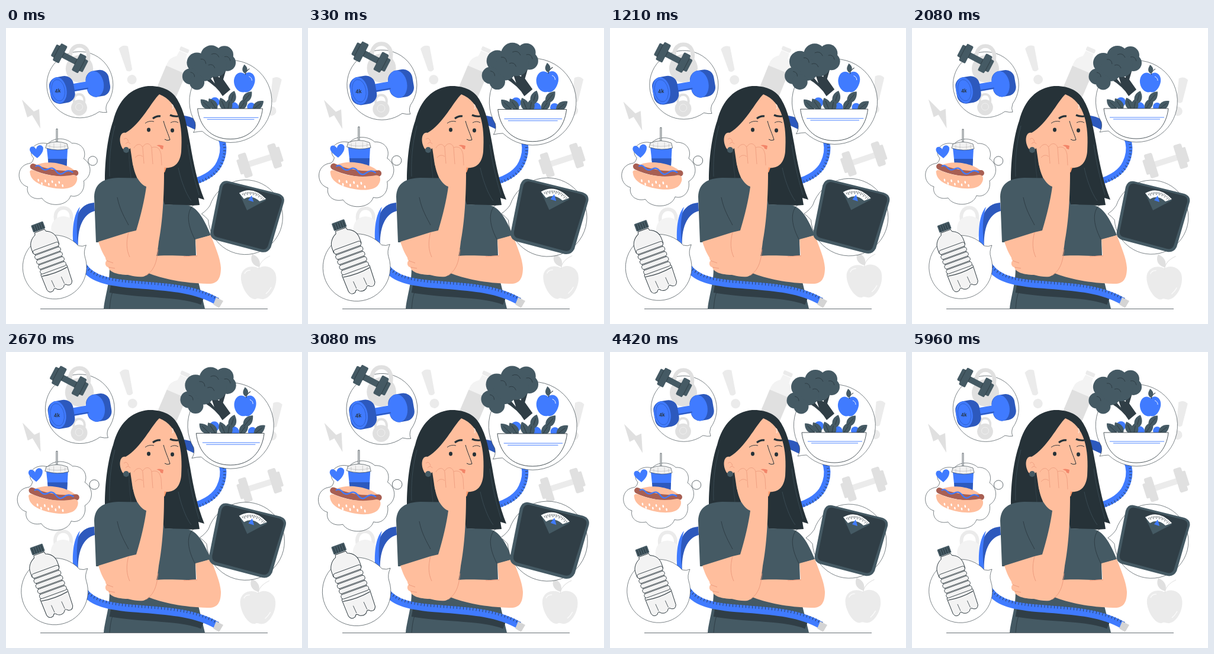
Recreate the animation shown at these times as an HTML page with a canvas. Size 500 by 500 pixels, loop 6 s.

```html
<!DOCTYPE html>
<html lang="en">
<head>
<meta charset="utf-8">
<title>Healthy habits worries</title>
<style>
html, body { margin: 0; width: 100%; height: 100%; overflow: hidden; background: #fff; }
canvas { display: block; width: 100vw; height: 100vh; }
</style>
</head>
<body>
<canvas id="stage"></canvas>
<script>
const canvas = document.getElementById('stage');
const c = canvas.getContext('2d');
const LOOP = 6000;
const INK = '#263238', SLATE = '#455a64', DARK = '#303e46', SKIN = '#ffbe9d', FOLD = '#e99477';
const BLUE = '#407bff', DEEP = '#2d59bd', GREY = '#e0e0e0', PALE = '#ebebeb';

const cache = {};
function path(d, fill, stroke, w = 0.7) {
  const p = cache[d] || (cache[d] = new Path2D(d));
  if (fill) { c.fillStyle = fill; c.fill(p); }
  if (stroke) { c.strokeStyle = stroke; c.lineWidth = w; c.stroke(p); }
}
function oval(x, y, rx, ry, fill, stroke, turn = 0, w = 0.7) {
  c.beginPath();
  c.ellipse(x, y, rx, ry, turn, 0, 7);
  if (fill) { c.fillStyle = fill; c.fill(); }
  if (stroke) { c.strokeStyle = stroke; c.lineWidth = w; c.stroke(); }
}
const dot = (x, y, r, fill, stroke) => oval(x, y, r, r, fill, stroke);
function box(x, y, w, h, r, fill, stroke) {
  c.beginPath();
  c.roundRect(x, y, w, h, r);
  if (fill) { c.fillStyle = fill; c.fill(); }
  if (stroke) { c.strokeStyle = stroke; c.lineWidth = 0.8; c.stroke(); }
}
function at(x, y, turn, scale, draw) {
  c.save();
  c.translate(x, y);
  c.rotate(turn);
  c.scale(scale, scale);
  draw();
  c.restore();
}
const grow = (x, y, s, draw) => at(x, y, 0, s, () => { c.translate(-x, -y); draw(); });

// Keys are [time, value] pairs.
function tween(keys, t, soft) {
  let i = 1;
  while (i < keys.length - 1 && t > keys[i][0]) i++;
  const [t0, a] = keys[i - 1], [t1, b] = keys[i];
  let k = Math.min(1, Math.max(0, (t - t0) / (t1 - t0)));
  if (soft) k = (1 - Math.cos(Math.PI * k)) / 2;
  return a + (b - a) * k;
}
const BEAT = [[0, 1], [600, 1.1], [1800, 1], [2400, 1], [3000, 1.1], [3650, 1], [6000, 1]];
const SWAY = [[0, 0], [1200, -0.9], [2450, 0.42], [3100, 0.3], [4500, -0.22], [6000, 0]];
const BOLT = [[0, 1], [650, 1.6], [1200, -1.6], [2080, 1.4], [3080, 1], [4420, -1.6], [6000, 1]];

function kettlebell(x, y, s, handle, body) {
  at(x, y, 0, s, () => {
    path('M-13 4 C-26 -34 26 -34 13 4', null, handle, 6.5);
    dot(0, 14, 23, body);
  });
}

function alarm(x, y, turn, s) {
  at(x, y, turn, s, () => {
    path('M-8 -30 Q0 -36 8 -30 L5 9 Q0 14 -5 9 Z', PALE);
    dot(0, 26, 8, PALE);
  });
}

function greyBottle() {
  at(284, 78, 0.4, 1, () => {
    path('M-7 -40 L7 -40 L8 -30 Q18 -23 18 -12 L18 45 L-18 45 L-18 -12 Q-18 -23 -8 -30 Z', '#f3f3f3');
    path('M-18 -8 L18 -8 L18 45 L-18 45 Z', GREY);
    box(-8, -48, 16, 7, 2, PALE);
  });
}

function greyDumbbell() {
  at(429, 224, -0.31, 1, () => {
    box(-27, -5, 54, 10, 2, PALE);
    for (const k of [-1, 1]) {
      box(k * 26 - 7, -21, 14, 42, 3, GREY);
      box(k * 34 - 4, -13, 8, 26, 2, GREY);
    }
  });
}

function greyApple() {
  path('M427 406 C433 400 449 401 455 414 C461 432 448 456 435 458 C430 459 426 455 422 458 C410 460 395 435 397 418 C400 402 418 400 427 406 Z', PALE);
  path('M427 407 C428 397 435 390 446 385', null, GREY, 1);
  path('M428 404 C415 401 412 391 416 382 C426 386 431 393 428 404 Z', GREY);
  path('M403 415 C405 410 409 409 413 409 M448 438 Q444 445 439 449', null, '#fafafa', 1.5);
}

function backdrop(t) {
  at(245, 243, tween(SWAY, t, true) * Math.PI / 180, 1, () => {
    c.translate(-245, -243);
    at(tween(BOLT, t, true), 0, 0, 1, () =>
      path('M26 121 L46 141 L55 137 L57 170 L43 147 L35 151 Z', GREY));
    alarm(206, 62, -0.26, 1);
    alarm(453, 115, 0.17, 0.98);
    greyBottle();
    kettlebell(97, 326, 0.9, PALE, '#f3f3f3');
    greyDumbbell();
    greyApple();
  });
}

function ticks(d, dx, dy) {
  c.save();
  c.translate(dx, dy);
  c.setLineDash([0.8, 4.7]);
  path(d, null, INK, 4.5);
  c.restore();
}

function tapeBack() {
  const d = 'M345 162 C368 180 372 205 361 228 C353 245 337 254 316 260';
  path(d, null, BLUE, 11);
  ticks(d, 2.5, 2.5);
  path('M300 148 C310 149 317 152 325 158 L320 172 L303 164 Z', DEEP);
  path('M149 295 C122 297 112 322 114 372 L122 372 C120 338 130 314 150 309 Z', DEEP);
  path('M125 302 C114 315 111 340 114 372 L122 372 C119 344 118 325 125 302 Z', BLUE);
}

function tapeFront() {
  path('M176 440 C230 450 295 446 332 461', null, DARK, 14);
  const d = 'M126 394 C138 421 165 428 202 432 C258 437 315 437 357 462';
  path(d, null, BLUE, 12.5);
  ticks(d, 1, -4);
  path('M355 455 L367 461 L360 473 L350 467 Z', '#d4d4d4');
}

function face() {
  path('M240 98 C264 97 281 106 289 120 C302 141 306 168 311 195 C317 230 323 260 335 290 L325 287 L327 299 C305 301 285 299 266 298 L258 260 L167 257 C167 222 172 182 181 157 C190 121 211 101 240 98 Z', INK);
  path('M259 112 C246 124 228 162 202 177 C193 175 190 188 195 200 C198 208 205 208 210 203 L214 230 L222 255 L262 244 L266 236 C285 238 294 228 296 209 C299 165 292 125 259 112 Z', SKIN);
  path('M262 234 L271 236 L268 244 L262 242 Z', '#ff9a6c');
  path('M199 188 Q204 183 207 192 M202 196 Q206 190 210 196', null, FOLD);
  dot(203, 206, 5, SLATE);
  path('M248 153 Q254 148 261 149', null, INK, 3.2);
  path('M277 147 Q283 150 291 149', null, INK, 3.2);
  path('M235 161 Q241 156 250 158 M278 160 Q285 156 291 160', null, INK, 0.9);
  oval(241, 172, 3, 3.4, INK);
  oval(281, 173, 3, 3.4, INK);
  path('M266 157 C269 169 275 181 277 189 Q272 191 268 188', null, INK, 1);
  path('M249 201 Q257 195 266 199 L265 205 Q256 202 249 201 Z', '#f28468');
  path('M280 129 Q284 132 281 137', null, '#ffdccb', 2);
  path('M208 207 C207 230 211 245 211 255', null, '#37474f', 0.7);
  path('M184 165 C176 195 174 225 175 251 M291 236 C296 260 305 282 313 292 M307 197 C312 235 321 265 326 282', null, SLATE, 0.6);
}

function body() {
  path('M149 285 C150 263 163 254 190 253 L255 254 L268 298 L306 299 C323 303 333 319 346 350 L320 358 L321 385 L324 425 L336 474 L165 474 C168 447 178 425 174 390 L172 362 L152 362 Z', SLATE);
  path('M188 286 C192 307 201 321 207 333 M319 357 C304 328 306 308 317 299 M180 446 C176 457 176 467 175 474', null, INK, 0.7);
  path('M320 357 L346 350 C354 371 362 389 363 405 C363 425 356 433 340 432 C301 431 264 424 238 413 L248 386 C274 382 302 387 322 384 Z', SKIN);
  path('M178 382 C168 382 166 389 170 393 C166 396 168 404 173 404 C174 412 187 416 202 417 L235 417 L225 385 Z', SKIN);
  path('M156 361 L207 345 L220 342 C228 316 234 290 237 268 C219 261 209 228 215 197 C223 187 240 190 260 201 L269 222 L267 244 C267 295 263 336 258 361 C254 398 246 416 232 420 C204 422 183 407 174 396 C164 384 160 373 156 361 Z', SKIN);
  path('M207 345 C203 361 203 374 209 387 M237 418 C253 407 255 390 257 374 M170 393 L181 397 M173 404 L184 406 M323 385 C316 384 309 386 300 386', null, FOLD, 0.8);
  path('M216 203 C220 195 229 194 231 203 L233 229 M231 201 C236 192 245 195 246 203 L248 230 M246 202 C255 199 260 203 262 214 L263 232 M218 219 Q224 212 231 217', null, FOLD, 0.7);
}

function bubble(d) { path(d, '#fff', INK, 0.6); }

function blackDumbbell() {
  at(107.5, 51.5, 0.48, 1, () => {
    box(-15, -5, 30, 10, 1, SLATE);
    for (const k of [-1, 1]) {
      box(k * 18 - 6, -16, 12, 32, 2, SLATE);
      box(k * 26 - 4, -11, 8, 22, 2, SLATE);
    }
    path('M-12 -5 L-12 5 M12 -5 L12 5 M-24 -12 L-24 12 M24 -12 L24 12', null, INK, 0.6);
  });
}

function gym() {
  bubble('M170 128 A55.5 55.5 0 1 0 157 141 Q165 143 170 142 Q167 136 170 128 Z');
  kettlebell(124, 55, 1, GREY, GREY);
  kettlebell(123.5, 126, 0.58, GREY, GREY);
  dot(123.5, 133, 6, null, '#f5f5f5');
  blackDumbbell();
  at(124, 99, -0.17, 1, () => {
    box(12, -22, 39, 44, 15, DEEP);
    oval(26, 0, 15, 22, BLUE);
    box(-16, -6.5, 34, 13, 3, BLUE);
    path('M-14 5 L14 5', null, DEEP, 2);
    box(-50, -22, 41, 45, 15, DEEP);
    oval(-36, 0, 14, 22, BLUE);
    oval(-36, 0, 11, 18, null, DEEP);
    c.fillStyle = INK;
    c.font = 'italic bold 9px Lato, sans-serif';
    c.textAlign = 'center';
    c.fillText('4k', -37, 4);
  });
}

function meal() {
  bubble('M47 220 C35 207 51 190 71 196 C83 183 103 187 111 195 C128 194 136 208 131 221 C145 230 145 250 131 258 C134 276 121 287 109 283 C103 302 70 302 61 287 C45 291 34 280 37 268 C18 263 17 233 39 229 Q45 229 47 220 Z');
  dot(146, 224.5, 7.7, '#fff', INK);
  path('M85 194 L85 171 L87 171 L87 194 Z', '#fff', INK, 0.7);
  path('M69 203 L104 203 L102 240 L73 240 Z', BLUE);
  path('M71 221 L103 221 L102 240 L73 240 Z', DEEP);
  path('M69 196 Q86 189 103 196 L105 204 Q87 209 67 203 Z', '#f2f2f2', INK, 0.6);
  path('M68 199 Q86 204 104 199 M74 197 L74 203 M81 195 L81 204 M92 195 L92 204 M99 197 L99 203', null, '#b8b8b8', 0.6);
  path('M53 220 C47 215 38 209 41 203 C44 198 50 202 51 205 C53 196 61 197 63 202 C64 209 59 215 53 220 Z', BLUE);
  path('M50 232 C68 222 105 229 117 242 L100 252 Z', SKIN);
  c.lineCap = 'round';
  path('M46 234 C62 242 92 249 117 245', null, '#a85f53', 10);
  c.lineCap = 'butt';
  path('M50 234 Q55 230 60 236 T72 238 T85 242 T98 244 T113 244', null, BLUE, 2.2);
  path('M41 245 C39 239 46 239 51 242 C70 250 93 252 113 248 C121 247 122 256 117 263 C111 272 93 273 75 269 C56 265 42 257 41 245 Z', SKIN);
  for (let i = 0; i < 8; i++)
    oval(55 + i * 5.8, 257 + (i % 2) * 5 + i * 0.6, 1.3, 2.4, '#fff', null, -0.2);
}

function water() {
  bubble('M122 368 A53.5 53.5 0 1 0 133 387 Q130 378 135 367 Q129 370 122 368 Z');
  at(73, 387, -0.35, 0.97, () => {
    path('M-9 -48 L9 -48 L10 -44 C20 -40 24 -32 24 -24 L24 -16 L21 -12 L21 20 L24 24 L23 52 Q20 60 13 56 Q9 51 6 57 Q0 61 -6 57 Q-10 51 -13 57 Q-21 60 -23 52 L-24 24 L-21 20 L-21 -12 L-24 -16 L-24 -24 C-24 -32 -19 -40 -10 -44 Z', '#f3f3f3', INK, 0.9);
    for (let y = -16; y <= 20; y += 9) box(-23.5, y - 4, 47, 7.5, 3.7, '#f3f3f3', INK);
    path('M-23 27 Q0 31 23 27', null, INK, 1.1);
    path('M-9 52 L-10 39 M9 52 L8 39', null, INK, 0.7);
    box(-11, -62, 22, 13, 1.5, SLATE);
    for (let x = -8; x < 10; x += 4) path(`M${x} -60 L${x} -50`, null, INK, 0.9);
  });
}

function broccoli() {
  path('M338 76 L353 94 L347 76 L361 84 L362 68 L372 70 L367 87 L379 104 L366 115 Q357 99 335 86 Z', DARK);
  const lumps = [[323, 59, 17], [347, 48, 18], [369, 46, 15], [374, 59, 14], [354, 64, 19], [335, 72, 18], [312, 82, 13.5], [323, 92, 12.5]];
  for (const [x, y, r] of lumps) dot(x, y, r, SLATE);
  path('M329 53 Q337 52 338 61 M347 45 Q356 41 360 50 M369 49 Q377 47 379 56 M312 75 Q319 76 319 83 M342 63 Q350 60 353 68', null, INK, 0.7);
}

function salad() {
  bubble('M320 159 A69 69 0 1 1 332 174 Q325 174 317 176 Q322 169 320 159 Z');
  broccoli();
  path('M403 78 C412 71 422 79 420 91 C418 102 410 111 403 108 C393 111 384 100 385 88 C387 75 397 73 403 78 Z', BLUE);
  path('M404 79 Q404 74 411 69', null, INK, 1);
  path('M403 77 C395 71 402 64 402 62 C409 67 409 73 403 77 Z', SLATE);
  path('M410 82 Q415 84 415 89', null, '#fff', 0.9);
  dot(353, 125, 8, BLUE);
  dot(384, 134, 9, BLUE);
  dot(414, 133, 7, BLUE);
  const leaves = [[338, 129, -0.8], [350, 129, -0.6], [367, 129, -0.4], [382, 118, 0.3], [400, 129, 0.6], [407, 117, 0.7], [425, 131, 0.9], [376, 131, 0.2]];
  for (const [x, y, turn] of leaves) at(x, y, turn, 1.12, () => {
    path('M0 10 C-9 3 -6 -6 0 -11 C6 -5 9 4 0 10 Z', SLATE);
    path('M0 9 L0 -6', null, INK, 0.6);
  });
  path('M324 136 L433 136 C430 164 412 187 379 187 C346 187 327 165 324 136 Z', '#fff', INK, 0.8);
  path('M334 151 L426 151 M340 154 L419 154', null, BLUE, 0.9);
}

function weigh() {
  bubble('M345 300 A62.5 62.5 0 1 1 342 324 Q337 318 331 314 Q340 308 345 300 Z');
  path('M375 259 L460 280 Q471 284 469 294 L447 370 Q442 380 431 378 L355 358 Q344 354 346 343 L361 268 Q365 257 375 259 Z', SLATE);
  path('M377 263 L458 283 Q467 286 465 294 L442 368 Q439 375 431 373 L357 353 Q350 351 351 343 L366 269 Q369 261 377 263 Z', DARK);
  path('M394 279 Q419 269 439 291 L407 308 Z', SLATE);
  path('M394 279 Q417 266 439 289 L428 293 Q415 281 402 289 Z', '#fff');
  at(412, 307, 0.22, 1, () => {
    for (let i = -7; i <= 7; i++) {
      const a = i * 0.095, r = i % 2 ? 27 : 25;
      path(`M${Math.sin(a) * 30} ${-Math.cos(a) * 30} L${Math.sin(a) * r} ${-Math.cos(a) * r}`, null, INK, 0.7);
    }
  });
  path('M415 283 L418 294 L409 291 Z', BLUE);
}

function draw(t) {
  const w = canvas.clientWidth, h = canvas.clientHeight, d = devicePixelRatio || 1;
  if (canvas.width !== Math.round(w * d) || canvas.height !== Math.round(h * d)) {
    canvas.width = Math.round(w * d);
    canvas.height = Math.round(h * d);
  }
  c.setTransform(canvas.width / 500, 0, 0, canvas.height / 500, 0, 0);
  c.fillStyle = '#fff';
  c.fillRect(0, 0, 500, 500);
  c.lineJoin = 'round';
  backdrop(t);
  path('M58 474.5 L442 474.5', null, INK, 0.7);
  tapeBack();
  face();
  body();
  tapeFront();
  const s = tween(BEAT, (t + 50) % LOOP);
  grow(123.5, 89.5, s, gym);
  grow(88, 235, s, meal);
  grow(83.5, 391, s, water);
  grow(375, 112, s, salad);
  grow(400, 320, s, weigh);
}

const start = performance.now();
function frame(now) {
  draw(Math.max(0, now - start) % LOOP);
  requestAnimationFrame(frame);
}
draw(0);
requestAnimationFrame(frame);
</script>
</body>
</html>
```
